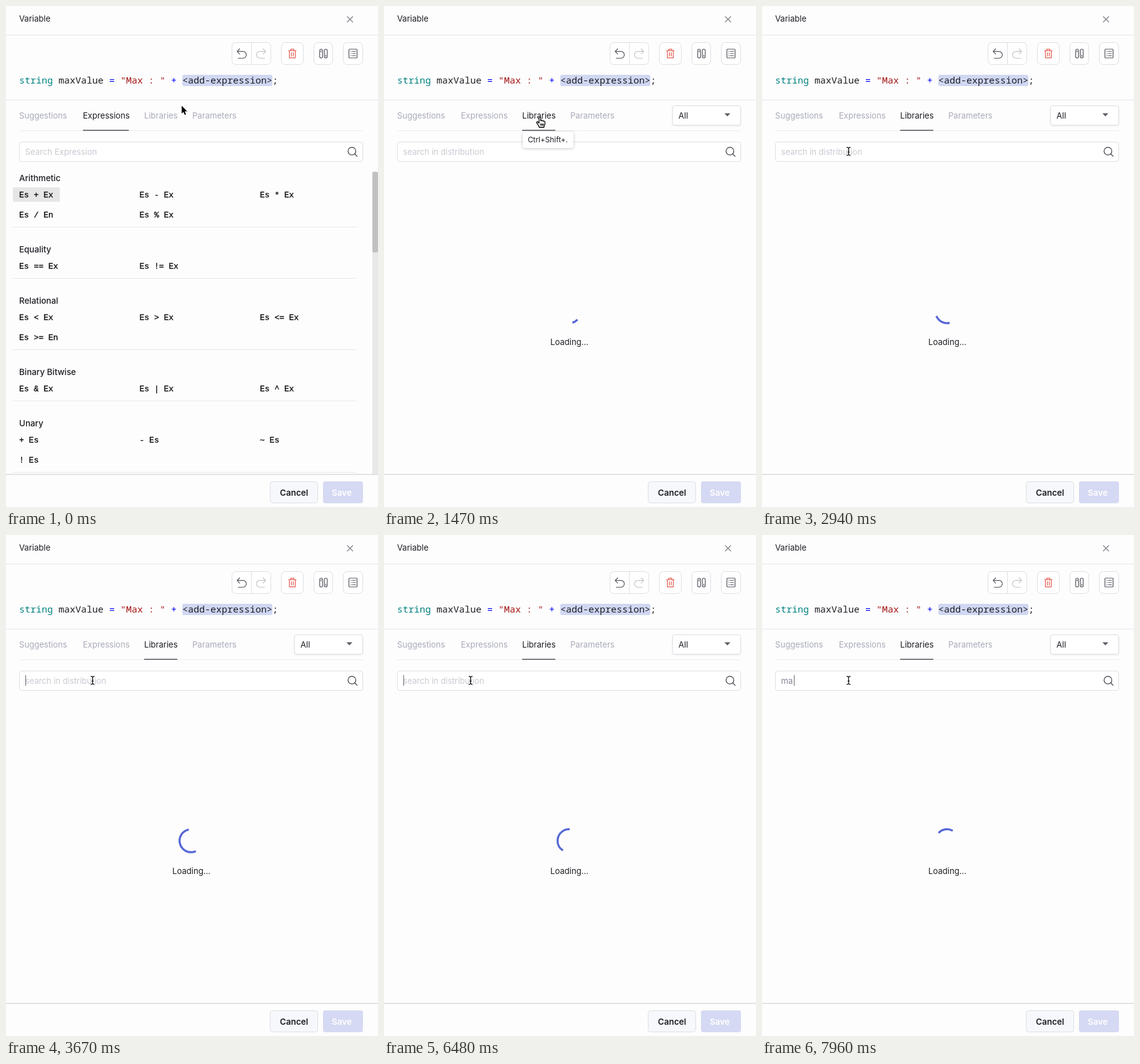
An HTML page for the animation above (8000 ms loop, 595 by 801 pixels).

```html
<!DOCTYPE html>
<html lang="en">
<head>
<meta charset="utf-8">
<title>Variable editor</title>
<style>
  html, body { margin: 0; width: 100%; height: 100%; overflow: hidden; background: #fdfdfd; }
  svg { display: block; width: 595px; height: 801px; }
  text { font: 13.1px Inter, "Open Sans", sans-serif; fill: #1d1d24; white-space: pre; }
  .head { font-size: 13.4px; font-weight: 500; }
  .tab { fill: #a9abb8; }
  .hint { fill: #c9cad2; }
  .typed { fill: #85879a; }
  .tab.on { fill: #1d1d24; }
  .code { font: 15px "Noto Sans Mono", "DejaVu Sans Mono", monospace; }
  .item { font: 13px "Liberation Mono", "Courier New", monospace; fill: #111; stroke: #111; stroke-width: .35; }
  .button { font-size: 13.5px; font-weight: 600; }
  .tip { font-size: 11.8px; }
  .icon { fill: none; stroke: #55565f; stroke-width: 1.2; stroke-linecap: round; stroke-linejoin: round; }
  .box { fill: #fff; stroke: #dedfe6; }
  .rule { fill: #e6e7eb; }
  .soft { filter: drop-shadow(0 1px 2.5px rgba(0, 0, 0, .22)); }
  .flat { filter: drop-shadow(0 1px 1px rgba(0, 0, 0, .08)); }
</style>
</head>
<body>
<svg viewBox="0 0 595 801">
  <rect width="595" height="801" fill="#fdfdfd"/>

  <text x="21" y="25">Variable</text>
  <path class="icon" d="M546 17l8.5 8.5M554.5 17l-8.5 8.5" style="stroke:#83848d;stroke-width:1.4"/>
  <rect class="rule" y="46" width="595" height="1"/>
  <rect class="rule" y="150" width="595" height="1"/>

  <g id="toolbar">
    <rect class="box" x="361.5" y="58.5" width="62" height="35" rx="6"/>
    <path d="M392.5 59v34" stroke="#dedfe6"/>
    <rect class="box" x="440.5" y="58.5" width="35" height="35" rx="6"/>
    <rect class="box" x="492.5" y="58.5" width="30" height="35" rx="6"/>
    <rect class="box" x="539.5" y="58.5" width="31" height="35" rx="6"/>
    <path id="undo" class="icon" d="M373.7 68.5l-4 4.2 4 4.2M370 72.7h9a5.4 5.4 0 0 1 0 10.8h-7.5"/>
    <use href="#undo" transform="translate(785 0) scale(-1 1)" opacity=".35"/>
    <path class="icon" style="stroke:#e5584d" d="M452 71.5h12M455.5 71.5v-2.3h5v2.3M453.3 71.5v11.3h9.4V71.5M456.5 74.5v5.5M459.5 74.5v5.5"/>
    <path class="icon" d="M504 69a2.3 2.3 0 0 1 2.3 2.3v9.4a2.3 2.3 0 0 1-4.6 0v-9.4A2.3 2.3 0 0 1 504 69zM511.5 69a2.3 2.3 0 0 1 2.3 2.3v9.4a2.3 2.3 0 0 1-4.6 0v-9.4a2.3 2.3 0 0 1 2.3-2.3zM504 71.5v2M511.5 78.5v2"/>
    <path class="icon" d="M549.5 69h11a1 1 0 0 1 1 1v12a1 1 0 0 1-1 1h-11a1 1 0 0 1-1-1v-12a1 1 0 0 1 1-1zM551.5 72.5h.5M554 72.5h5M551.5 76h.5M554 76h5M551.5 79.5h.5M554 79.5h5"/>
  </g>

  <rect x="282" y="110" width="144" height="18" rx="3" fill="#d0d7f2"/>
  <text class="code" x="21" y="124"><tspan fill="#008080">string</tspan> maxValue <tspan fill="#0000ff">=</tspan> <tspan fill="#a31515">"Max : "</tspan> <tspan fill="#0000ff">+</tspan> &lt;add-expression&gt;;</text>

  <rect x="21" y="199" width="550" height="1" fill="#ececf0"/>
  <text class="tab" x="21" y="180">Suggestions</text>
  <text class="tab" id="tabExpr" x="123" y="180">Expressions</text>
  <text class="tab" id="tabLib" x="221" y="180">Libraries</text>
  <text class="tab" x="298" y="180">Parameters</text>
  <rect id="underline" y="198" height="1.3" fill="#40404b"/>

  <rect class="box" x="21.5" y="217.5" width="549" height="31" rx="3.5"/>
  <text id="field" x="30.5" y="237.5"></text>
  <rect id="caret" y="224" width="1" height="17" fill="#65666f"/>
  <g class="icon" style="stroke:#3d3e46">
    <circle cx="553.3" cy="232" r="6.2"/><path d="M557.8 236.5l3.8 3.8"/>
  </g>

  <g id="expressions">
    <rect x="586" y="265" width="9" height="483" fill="#e8e8e8"/>
    <rect id="thumb" x="586" y="265" width="9" height="129" rx="2.5"/>
    <rect x="11" y="290" width="75" height="23" fill="#e6e6e6"/>
  </g>

  <g id="libraries">
    <rect class="box flat" x="461.5" y="159.5" width="109" height="31" rx="3.5"/>
    <text x="471" y="179.5">All</text>
    <path d="M544.5 171.5h9.5l-4.75 5z" fill="#5e5f68"/>
    <g transform="translate(296 488.8) scale(.909)">
      <g id="spin"><circle id="arc" r="20.2" fill="none" stroke="#5567d5" stroke-width="3.6"/></g>
    </g>
    <text x="266" y="541.5">Loading...</text>
  </g>

  <rect y="748" width="595" height="53" fill="#fdfdfd"/>
  <rect y="748" width="595" height="1.6" fill="#dcdde0"/>
  <rect class="box" x="422.5" y="760.5" width="76" height="34" rx="4" style="fill:#f7f8fb"/>
  <text class="button" x="438" y="783">Cancel</text>
  <rect x="507" y="760" width="64" height="35" rx="4" fill="#d6d9f3"/>
  <text class="button" x="521" y="783" style="fill:#fff">Save</text>

  <g id="tooltip">
    <rect class="soft" x="222" y="201" width="81" height="26" rx="4" fill="#fff"/>
    <text class="tip" x="230" y="218">Ctrl+Shift+.</text>
  </g>

  <g id="pointer" stroke-linejoin="round">
    <path id="arrow" d="M0 0V12.4l2.8-2.6 2.1 4.8 2-.9-2.1-4.6H8.8z" fill="#000" stroke="#fff" stroke-width="1.2" paint-order="stroke"/>
    <path id="hand" d="M-1.5 1.3C-1.5-.4 1.2-.4 1.2 1.3V6c.4-1.1 2.3-.9 2.4.4.5-.9 2.2-.6 2.3.6.6-.7 2-.3 2 1V11c0 2.3-1.6 3-1.6 5.5H-1.2C-1.4 14-4.6 11.5-5.2 9c-.4-1.6 1.2-2 2.2-.8l1.5 1.6zM1.2 10.5v3.5M3.3 10.5v3.5M5.2 10.5v3.5" fill="#fff" stroke="#000" stroke-width="1.3"/>
    <path id="beam" d="M-3-6.5q2.4 0 3 1.4.6-1.4 3-1.4M0-5V5M-3 6.5q2.4 0 3-1.4.6 1.4 3 1.4M-1.5 1h3" fill="none" stroke="#111" stroke-width="1.3"/>
  </g>
</svg>

<script>
const LOOP = 8000, TICK = 147.3, LEAD = 13;
const OPEN = 9, FOCUS = 22, BLINK = 6.65, SPIN_STEP = 0.10736;
const $ = id => document.getElementById(id);
const show = (id, on) => { $(id).style.display = on ? '' : 'none'; };

// Heading, heading baseline, divider, items
const sections = [
  ['Arithmetic', 280, 353, ['Es + Ex', 'Es - Ex', 'Es * Ex', 'Es / En', 'Es % Ex']],
  ['Equality', 394, 435, ['Es == Ex', 'Es != Ex']],
  ['Relational', 476, 549, ['Es < Ex', 'Es > Ex', 'Es <= Ex', 'Es >= En']],
  ['Binary Bitwise', 590, 631, ['Es & Ex', 'Es | Ex', 'Es ^ Ex']],
  ['Unary', 672, 745, ['+ Es', '- Es', '~ Es', '! Es']]
];

function add(tag, attrs, content = '') {
  const el = document.createElementNS('http://www.w3.org/2000/svg', tag);
  for (const key in attrs) el.setAttribute(key, attrs[key]);
  el.textContent = content;
  $('expressions').append(el);
}

for (const [title, y, rule, items] of sections) {
  add('text', { class: 'head', x: 21, y }, title);
  items.forEach((item, i) => add('text', {
    class: 'item', x: 21 + 192.5 * (i % 3), y: y + 26 + 32 * Math.floor(i / 3)
  }, item));
  add('rect', { class: 'rule', x: 11, y: rule, width: 550, height: 1 });
}

const dash = $('arc').animate([
  { strokeDasharray: '1px, 200px', strokeDashoffset: '0px', easing: 'ease-in-out' },
  { strokeDasharray: '100px, 200px', strokeDashoffset: '-15px', easing: 'ease-in-out' },
  { strokeDasharray: '100px, 200px', strokeDashoffset: '-125px' }
], { duration: 1000, iterations: Infinity });
dash.pause();

// Pointer path: tick, x, y, shape
const path = [
  [0, 281, 159.5, 'arrow'], [1, 272, 161, 'arrow'], [2, 260, 163, 'arrow'],
  [3, 251, 165, 'arrow'], [4, 247.5, 166, 'arrow'], [7, 249.5, 177.5, 'hand'],
  [16, 238, 184, 'hand'], [17, 193, 208, 'arrow'], [18, 153, 228, 'beam'],
  [19, 138.5, 232.5, 'beam']
];
// Tooltip: tick, opacity
const tipSteps = [[0, 0], [8, .08], [9, .8], [10, 1], [17, .4], [18, 0]];
const typed = [[0, ''], [52, 'm'], [53, 'ma']];
const at = (steps, n) => steps.filter(s => s[0] <= n).pop();

function draw(n) {
  const open = n >= OPEN;
  show('expressions', !open);
  show('libraries', open);
  $('tabExpr').classList.toggle('on', !open);
  $('tabLib').classList.toggle('on', open);
  $('underline').setAttribute('x', open ? 221 : 123);
  $('underline').setAttribute('width', open ? 53 : 73.5);
  $('thumb').setAttribute('fill', n < 1 ? '#c1c1c1' : '#a8a8a8');

  const word = at(typed, n)[1];
  $('field').textContent = word || (open ? 'search in distribution' : 'Search Expression');
  $('field').setAttribute('class', word ? 'typed' : 'hint');
  show('caret', word || (n >= FOCUS && (n - FOCUS) % BLINK < BLINK / 2));
  $('caret').setAttribute('x', [31, 42.5, 51][word.length]);

  if (open) {
    const turn = (n - OPEN) * SPIN_STEP + .001;
    dash.currentTime = turn * 1000;
    $('spin').setAttribute('transform', `rotate(${turn * 360 % 360})`);
  }

  const alpha = at(tipSteps, n)[1];
  const sx = .75 + .25 * alpha, sy = .6 + .4 * alpha;
  $('tooltip').setAttribute('opacity', alpha);
  $('tooltip').setAttribute('transform',
    `translate(262 201) scale(${sx} ${sy}) translate(-262 -201)`);

  const [, x, y, shape] = at(path, n);
  $('pointer').setAttribute('transform', `translate(${x} ${y})`);
  for (const id of ['arrow', 'hand', 'beam']) show(id, id === shape);
}

const start = performance.now();
function frame() {
  const t = (performance.now() - start) % LOOP;
  draw(Math.floor((t + LEAD) / TICK));
  requestAnimationFrame(frame);
}
frame();
</script>
</body>
</html>
```
